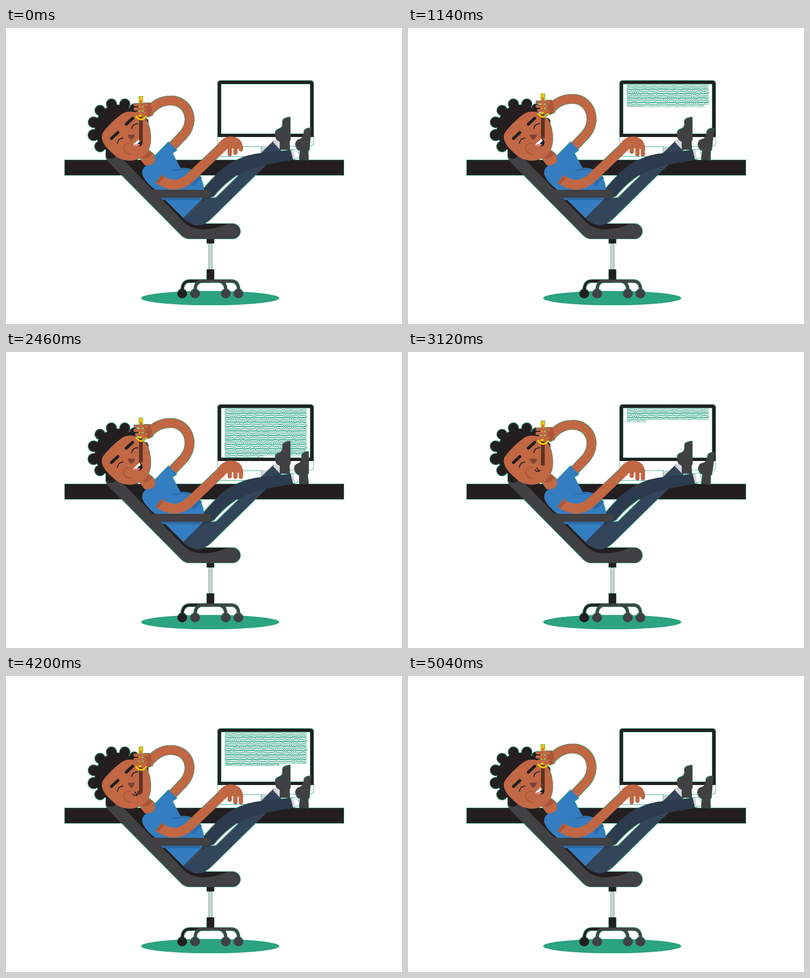
An HTML page for the animation above (5070 ms loop, 800x600 px).

```html
<!DOCTYPE html>
<html lang="en">
<head>
<meta charset="utf-8">
<title>Break at the desk</title>
<style>
html, body { margin: 0; width: 100%; height: 100%; overflow: hidden; background: #fff; }
svg { display: block; width: 800px; height: 600px; }
#scene { filter: url(#rim); }
.k { fill: #231f20; } .g { fill: #414042; } .s { fill: #c16744; } .d { fill: #ab5638; }
.l { fill: none; stroke-linecap: round; }
.sk { stroke: #c16744; } .kk { stroke: #231f20; } .gk { stroke: #414042; }
.b { stroke-linecap: butt; }
</style>
</head>
<body>
<svg viewBox="0 0 800 600">
<defs>
  <clipPath id="typed"><rect id="full" x="440" y="112" width="170"/><rect id="part" x="440" height="4.5"/></clipPath>
  <!-- thin green rim just inside the silhouette -->
  <filter id="rim" filterUnits="userSpaceOnUse" x="0" y="0" width="800" height="600" color-interpolation-filters="sRGB">
    <feMorphology in="SourceAlpha" operator="erode" radius="1" result="core"/>
    <feFlood flood-color="#2ca480" flood-opacity=".75"/>
    <feComposite in2="SourceAlpha" operator="in"/>
    <feComposite in2="core" operator="out" result="edge"/>
    <feMerge><feMergeNode in="SourceGraphic"/><feMergeNode in="edge"/></feMerge>
  </filter>
</defs>
<path id="text" clip-path="url(#typed)" fill="none" stroke="#2ca480"/>
<g id="scene">
  <ellipse cx="412.5" cy="547.5" rx="139.5" ry="14.5" fill="#2ca480"/>
  <!-- desk and computer -->
  <path class="k" d="M118 267H683V299H118Z"/>
  <path fill="#fff" d="M427 221H622V233Q622 240 615 240H434Q427 240 427 233Z"/>
  <path fill="#fff" stroke="#2ca480" stroke-opacity=".7" d="M431.500 240.500H515.500V260.500H431.500Z"/>
  <path fill="#d1d3d4" d="M516 240H541V258H516Z"/>
  <path class="k" fill-rule="evenodd" d="M434 106H615Q622 106 622 113V221H427V113Q427 106 434 106ZM435 114V214H614V114Z"/>
  <!-- chair -->
  <path class="l kk" stroke-width="7" d="M356 538V530Q357 513 372 513H412"/>
  <path class="l gk" stroke-width="7" d="M382 538V530Q383 513 398 513H428Q443 513 444 530V538M398 513H455Q469 513 470 530V538"/>
  <circle class="k" cx="356" cy="538" r="10"/>
  <g class="g"><circle cx="382" cy="538" r="10"/><circle cx="444" cy="538" r="10"/><circle cx="469.500" cy="538" r="10"/></g>
  <path fill="#d1d3d4" d="M409 436H417V491H409Z"/>
  <path class="k" d="M405 427H421V437H405ZM405 489H421V510H405Z"/>
  <path class="g" d="M201 246V260Q201 266 207 272L354 421Q361 428 370 428H458A15.500 15.500 0 0 0 458 396H395L357 385L238 262Z"/>
  <path class="k" d="M232 262H262L360 380L400 396H449Q425 409 392 408Q372 406 360 394Z"/>
  <!-- legs -->
  <path fill="#33455a" d="M357 385L395 346L424 343L541 228L558 246L418 384Q403 400 386 400Q370 398 357 385Z"/>
  <path fill="#d5d7da" d="M539 231L547 225L558 240L554 247Z"/>
  <path fill="#2c3b4d" d="M398 326C440 275 470 258 520 253L579 246L583 267C540 274 500 280 470 297C445 313 431 329 421 341L395 352Z"/>
  <path fill="#d5d7da" d="M575 247L580 246L585 265L580 267Z"/>
  <path fill="#fff" d="M580 246L590 245L594 262L584 266Z"/>
  <path class="g" d="M558 187Q562 180 575 180V226L573 231L574 247H553V231Q543 227 543 214Q543 206 550 204Q558 202 558 194Z"/>
  <path id="shoe" class="g" d="M597 209Q599 201 612 201V246L610 250L612 268H592V250Q582 246 582 236Q583 228 589 226Q597 224 597 214Z"/>
  <!-- head -->
  <g class="k" id="hair"><ellipse cx="226" cy="205" rx="47" ry="50"/><circle cx="280" cy="190" r="8"/></g>
  <path class="s" d="M268 262L288 246L300 256Q305 270 298 276Q290 281 280 278Z"/>
  <path class="d" d="M274 263L288 249L296 254Q292 262 280 265Z"/>
  <path class="s" d="M194 216C197 206 228 176 240 171C262 165 284 178 290 200C297 228 292 248 279 259C262 273 236 271 222 260C207 247 191 234 194 216Z"/>
  <path class="l kk" stroke-width="6" d="M213 224L226 212M243 195L256 183"/>
  <path class="l kk" stroke-width="1.800" d="M225 234Q226 224 236 223M254 204Q256 194 266 194"/>
  <path fill="#7d4434" d="M246 218q2-4 7-1q5-3 7 1q0 4-7 9q-6-5-7-9Z"/>
  <path class="l" stroke="#ab5638" stroke-width="2" d="M251 234Q238 233 238 245Q240 256 253 256"/>
  <g id="open"><path class="k" d="M258 237L271 224Q279 230 274 238Q266 243 258 237Z"/><path fill="#fff" d="M257 236L270 224L272 229L262 238Z"/><path fill="#e08a78" d="M256 238Q264 233 271 236Q267 243 256 238Z"/></g>
  <path id="shut" class="l kk" stroke-width="1.700" d="M256 239Q260 244 267 240M260 235Q264 238 264 243"/>
  <!-- raised arm, body -->
  <path id="arm" class="l sk" stroke-width="20"/>
  <path fill="#347dc1" d="M275 293Q276 281 286 278Q303 278 301 262L299 260L328 230L346 248L337 254L341 262L353 284C374 281 397 294 400 325Q400 341 393 350L358 385L300 327Q275 306 275 293Z"/>
  <path fill="#2c6ba8" d="M334 290Q360 278 383 293Q362 284 345 290ZM312 344H394L392 349H317ZM374 316L392 299L396 304L379 320Z"/>
  <path class="g" d="M292 328H405Q415 330 415 336Q412 344 404 344H307Z"/>
  <path class="l sk b" stroke-width="20" d="M308 306Q342 330 371 304L443 235"/>
  <path class="d" d="M302 313L315 299L319 304L307 317Z"/>
  <path class="s" d="M427 237Q438 220 454 220Q478 221 479 245H470L447 243Z"/>
  <path id="fingers" class="l sk" stroke-width="8.500"/>
  <!-- raised hand -->
  <g id="hand">
    <path fill="#f4c400" d="M268 138H277V180H268Z"/>
    <path fill="#d95b28" d="M271 146H274V172H271Z"/>
    <path id="stick" class="l b" stroke="#5d3224" stroke-width="7.500"/>
    <path class="s" d="M284 152H294L300 162L297 177L288 181H272L276 174H284Z"/>
    <path class="d" d="M278 151H291L295 165L292 178L284 181L278 176Z"/>
    <path class="l sk" stroke-width="6.500" d="M261 155.500H284M261 164H280M264 172.500H282"/>
    <path class="l b" stroke="#f4c400" stroke-width="3.500" d="M262 178Q273 193 284 178"/>
  </g>
</g>
</svg>
<script>
const $ = id => document.getElementById(id);
const set = (id, attrs) => { for (const k in attrs) $(id).setAttribute(k, attrs[k]); };

for (const [x, y, r] of [[213, 154, 11], [240, 154, 11], [190, 167, 11], [177, 191, 11.500],
  [177, 217, 12], [190, 240, 11.500], [212, 254, 11], [259, 163, 10]])
  $('hair').insertAdjacentHTML('beforeend', `<circle cx="${x}" cy="${y}" r="${r}"/>`);

// Lines of code: outlined pills of random width
let seed = 7;
const rand = () => (seed = seed * 16807 % 2147483647) / 2147483647;
const ROWS = 22, PITCH = 4.5, TOP = 115;
let code = '';
for (let row = 0; row < ROWS; row++) {
  const y = Math.round(TOP + row * PITCH) + .5;
  let x = 442.5;
  while (x < 606) {
    const w = Math.min(rand() < .45 ? 4 : 6 + rand() * 16, 607 - x);
    const h = Math.max(w - 3, 0);
    code += `M${x + 1.5} ${y}h${h}a1.5 1.5 0 0 1 0 3h${-h}a1.5 1.5 0 0 1 0-3z`;
    x += w;
  }
}
set('text', { d: code });

// Hand offset over one sip: [time, y]
const SIP = [[0, 0], [120, 2], [300, 4.5], [420, 5], [500, 4], [600, 1], [720, -2], [900, -5], [1020, -6], [1200, -5], [1260, 0]];
function lift(t) {
  const i = SIP.findIndex(k => k[0] > t), [a, y] = SIP[i - 1], [b, z] = SIP[i];
  return y + (z - y) * (t - a) / (b - a);
}
const TIPS = [[256, 253, 246], [251, 256, 256], [252, 253, 253]];

function draw(t) {
  const typed = t / 2520 * ROWS, row = Math.floor(typed);
  set('full', { height: 2.75 + row * PITCH });
  set('part', { y: TOP - .25 + row * PITCH, width: 2 + (typed - row) * 165 });

  const sip = t % 1260, dy = lift(sip), m = dy * .6;
  set('hand', { transform: `translate(0 ${dy})` });
  set('arm', { d: `M335 241L358 217C384 188 368 ${146 + m} 332 ${147 + m}C312 ${147 + m} 300 ${157 + dy} 290 ${167 + dy}` });
  set('stick', { d: dy > 3 ? 'M272.500 180V225Q273 233 265 232' : 'M272.500 180V229' });
  const shut = sip >= 300 && sip < 720;
  set('open', { visibility: shut ? 'hidden' : 'visible' });
  set('shut', { visibility: shut ? 'visible' : 'hidden' });

  const tips = TIPS[t / 60 % 3];
  set('fingers', { d: tips.map((y, i) => `M${[452, 463.5, 474.5][i]} 240V${y}`).join('') });
  set('shoe', { transform: `rotate(${4.2 + 4.5 * Math.sin(t / 280 * 2 * Math.PI)} 601 266)` });
}

const start = performance.now();
function tick() {
  const t = (performance.now() - start) % 5070;
  draw(Math.floor(t / 60) % 42 * 60);
  requestAnimationFrame(tick);
}
tick();
</script>
</body>
</html>
```
